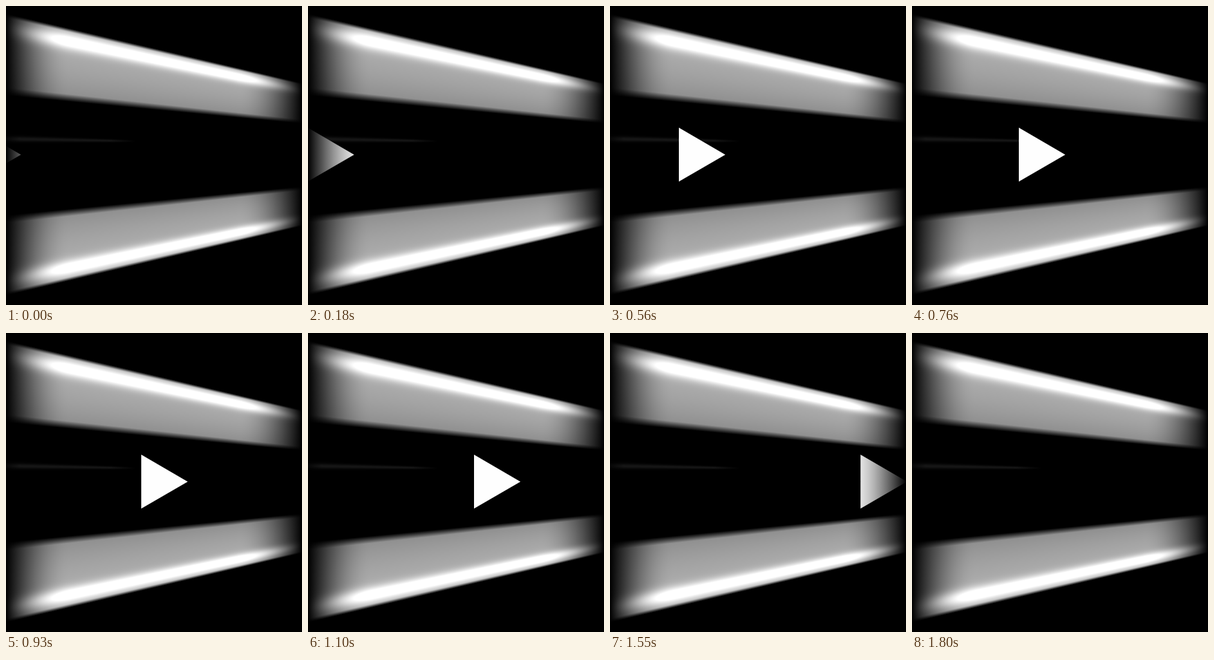
Write an HTML page with a canvas that moves like this. It is 460 by 464 pixels and loops after 1850 ms.

```html
<!DOCTYPE html>
<html lang="en">
<head>
<meta charset="utf-8">
<title>Arrow between beams</title>
<style>
  html, body { margin: 0; width: 100%; height: 100%; overflow: hidden; background: #000; }
  canvas { display: block; }
</style>
</head>
<body>
<canvas id="stage" width="460" height="464"></canvas>
<script>
const W = 460, H = 464, LOOP = 1850, FADE = 100;
const ctx = document.getElementById('stage').getContext('2d');

const clamp = v => Math.max(0, Math.min(1, v));
const mix = ([a, b], k) => a + (b - a) * k;
const smooth = v => { const k = clamp(v); return k * k * (3 - 2 * k); };
const bell = v => Math.exp(-v * v);

// Light dims towards both sides of the stage.
const sideFade = x => Math.sin(Math.PI / 2 * clamp(Math.min(x, W - x) / FADE));

// Edge heights at the left and right side of the stage.
const beams = [
  { outer: [12, 119.5], inner: [139, 182.5] },
  { outer: [449, 341.5], inner: [324.5, 280] }
];

// Brightness across a beam, from outer edge (0) to inner edge (1).
function beamLight(q) {
  const body = 175 - 38 * q * q + 110 * bell((q - .18) / .11);
  return body * smooth((q + .01) / .065) * clamp((1 - q) / .1);
}

function streak(x, y) {
  const spread = 4.2 - x * .014;
  return 22 * bell((y - 205.7 - x * .0175) / spread) * clamp((202 - x) / 40) * clamp(.3 + x / 30);
}

function makeBackdrop() {
  const image = ctx.createImageData(W, H);
  for (let x = 0; x < W; x++) {
    const k = (x + .5) / W, fade = sideFade(x + .5);
    for (let y = 0; y < H; y++) {
      let light = x < 202 ? streak(x, y) : 0;
      for (const { outer, inner } of beams) {
        const top = mix(outer, k);
        const q = (y + .5 - top) / (mix(inner, k) - top);
        if (q > 0 && q < 1) light = beamLight(q) * fade;
      }
      const i = (y * W + x) * 4;
      image.data.fill(Math.min(255, light), i, i + 3);
      image.data[i + 3] = 255;
    }
  }
  return image;
}

function makeArrowFill() {
  const fill = ctx.createLinearGradient(0, 0, W, 0);
  for (let x = 0; x <= W; x += 10) {
    const v = Math.round(254 * sideFade(x));
    fill.addColorStop(x / W, `rgb(${v},${v},${v})`);
  }
  return fill;
}

const backdrop = makeBackdrop();
const arrowFill = makeArrowFill();

// Steps last 40 ms, with 10 ms more about every sixth step.
const startOf = i => 40 * i + 10 * Math.min(i - 1, Math.floor((i + 12.25) / 6.25));

function stepAt(time) {
  let i = 0;
  while (startOf(i + 1) <= time) i++;
  return i;
}

// Back edge of the arrow: [step, x].
const path = [[0, -49], [8, 48], [18, 166], [22, 210.2], [43, 461]];

function arrowX(step) {
  const next = Math.max(1, path.findIndex(([s]) => s >= step));
  const [s0, x0] = path[next - 1], [s1, x1] = path[next];
  return mix([x0, x1], (step - s0) / (s1 - s0));
}

const start = performance.now();

function draw() {
  const x = arrowX(stepAt((performance.now() - start) % LOOP));
  ctx.putImageData(backdrop, 0, 0);
  ctx.fillStyle = arrowFill;
  ctx.beginPath();
  ctx.moveTo(x, 188.8);
  ctx.lineTo(x + 72.2, 230.7);
  ctx.lineTo(x, 272.6);
  ctx.fill();
  requestAnimationFrame(draw);
}
draw();
</script>
</body>
</html>
```
